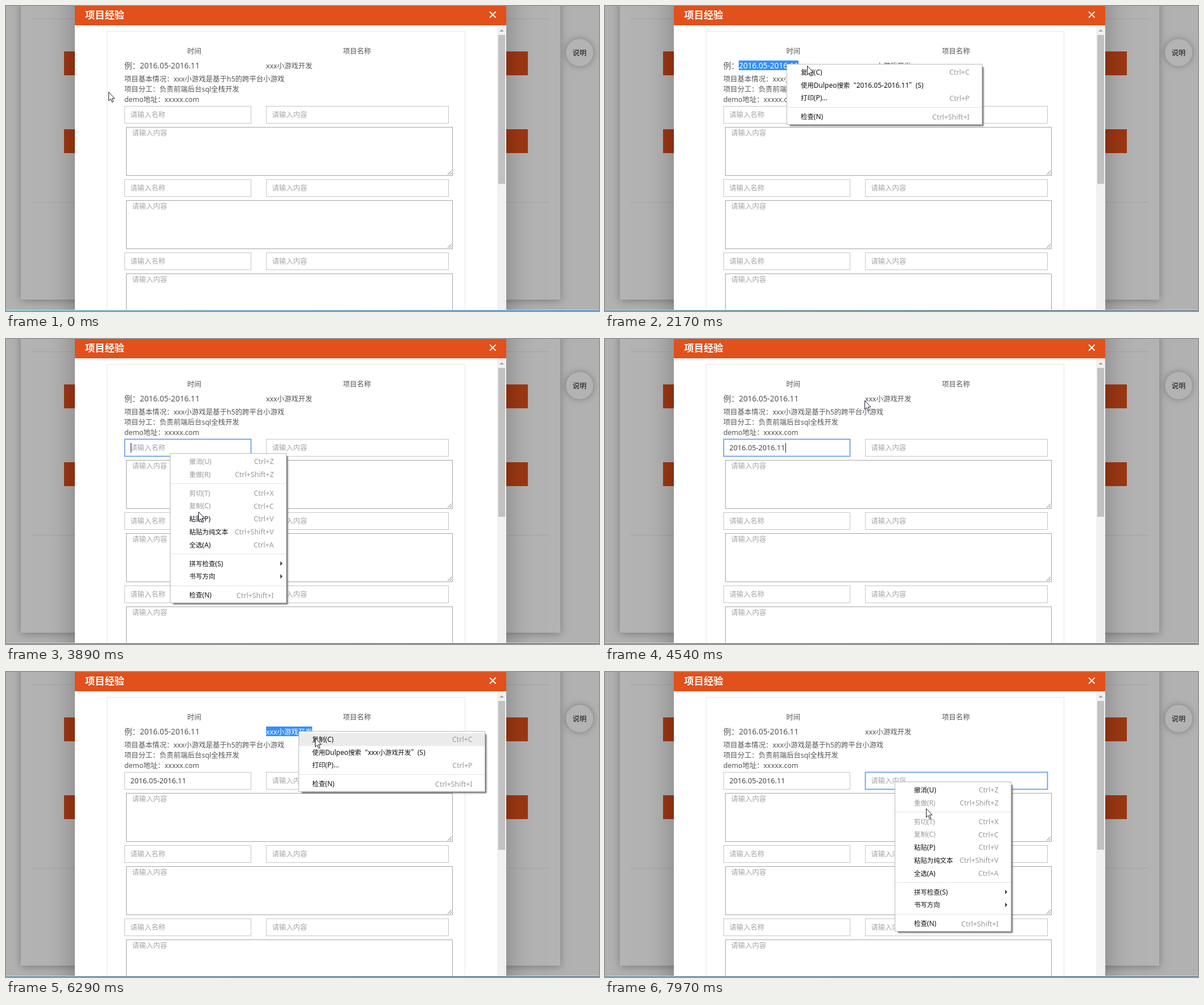
An HTML page with a canvas that plays this animation: 1042 px wide and 537 px high, repeating every 8 s.

```html
<!DOCTYPE html>
<html lang="zh-CN">
<head>
<meta charset="utf-8">
<style>
html, body { margin: 0; width: 100%; height: 100%; overflow: hidden; background: #b1b1b1; }
canvas { display: block; }
</style>
</head>
<body>
<canvas id="stage" width="1042" height="537"></canvas>
<script>
const c = document.getElementById('stage').getContext('2d');
const LOOP = 8000, STEP = 60;
const LATIN = '"Noto Sans","Open Sans","Noto Sans CJK SC",sans-serif';
const CJK = '"Noto Sans CJK SC","Noto Sans CJK",sans-serif';
const DATES = '2016.05-2016.11', GAME = 'xxx小游戏开发';

// Pointer path: time, x, y
const PATH = [
  [0, 181, 151], [240, 181, 151], [660, 250, 104], [780, 237, 104], [960, 236, 104],
  [1500, 346, 104], [1680, 330, 102], [1780, 320, 102], [1920, 320, 102], [2160, 355, 105],
  [2400, 362, 116], [2700, 297, 194], [2880, 289, 200], [3120, 289, 200], [3180, 298, 198],
  [3900, 342, 314], [4080, 342, 314], [4500, 456, 108], [4800, 457, 104], [4920, 457, 104],
  [5280, 542, 103], [5460, 541, 101], [5640, 515, 104], [5760, 515, 104], [5820, 522, 105],
  [6300, 546, 118], [6540, 546, 118], [6720, 514, 205], [7080, 508, 193], [7560, 509, 193],
  [7740, 513, 198], [7920, 564, 240], [8000, 564, 240]
];
// Times at which the pointer switches between arrow and I-beam
const SWITCHES = [480, 1920, 2520, 3120, 4560, 5400, 5520, 5760, 6960, 7560];

const copyMenu = query => [
  ['复制(C)', 'Ctrl+C'], [`使用Dulpeo搜索“${query}”(S)`], ['打印(P)...', 'Ctrl+P'], 0, ['检查(N)', 'Ctrl+Shift+I']
];
const editMenu = undoOff => [
  ['撤消(U)', 'Ctrl+Z', undoOff], ['重做(R)', 'Ctrl+Shift+Z', 1], 0,
  ['剪切(T)', 'Ctrl+X', 1], ['复制(C)', 'Ctrl+C', 1], ['粘贴(P)', 'Ctrl+V'],
  ['粘贴为纯文本', 'Ctrl+Shift+V'], ['全选(A)', 'Ctrl+A'], 0,
  ['拼写检查(S)', '>'], ['书写方向', '>'], 0, ['检查(N)', 'Ctrl+Shift+I']
];
const MENUS = [
  { from: 1960, to: 2420, x: 319, y: 102, w: 344, h: 107, pad: 25, items: copyMenu(DATES) },
  { from: 3130, to: 4080, x: 288, y: 201, w: 205, h: 264, pad: 34, items: editMenu(1) },
  { from: 5800, to: 6560, x: 514, y: 104, w: 328, h: 107, pad: 24, items: copyMenu(GAME) },
  { from: 7560, to: 8000, x: 509, y: 193, w: 205, h: 264, pad: 34, items: editMenu(0) }
];

function rect(x, y, w, h, color) {
  c.fillStyle = color;
  c.fillRect(x, y, w, h);
}
function box(x, y, w, h, color, line = 1) {
  c.strokeStyle = color;
  c.lineWidth = line;
  c.strokeRect(x + .5, y + .5, w - 1, h - 1);
}
function poly(points, x, y, fill, stroke) {
  c.beginPath();
  points.forEach(([px, py]) => c.lineTo(x + px, y + py));
  c.closePath();
  c.fillStyle = fill;
  c.fill();
  if (stroke) { c.strokeStyle = stroke; c.lineWidth = 1; c.stroke(); }
}
function lines(color, width, ...segments) {
  c.strokeStyle = color;
  c.lineWidth = width;
  c.beginPath();
  for (const [x1, y1, x2, y2] of segments) { c.moveTo(x1, y1); c.lineTo(x2, y2); }
  c.stroke();
}
function shadow(color, blur, draw, dy = 0) {
  c.save();
  c.shadowColor = color;
  c.shadowBlur = blur;
  c.shadowOffsetY = dy;
  draw();
  c.restore();
}
// Text centred on y; Chinese and Latin runs may differ in size
function text(str, x, y, color, size = 12.35, latin = size, weight = '') {
  c.fillStyle = color;
  for (const run of str.match(/[\x00-\xff]+|[^\x00-\xff]+/g)) {
    c.font = run.charCodeAt(0) < 256 ? `${weight} ${latin}px ${LATIN}` : `${weight} ${size}px ${CJK}`;
    c.fillText(run, x, y + size * .37);
    x += c.measureText(run).width;
  }
}

function page(t) {
  rect(0, 0, 1042, 537, '#b1b1b1');
  shadow('rgba(0,0,0,.3)', 14, () => rect(26, -20, 948, 537, '#b3b3b3'), 2);
  rect(45, 22, 910, 1, '#a3a3a3');
  rect(45, 345, 910, 1, '#a3a3a3');
  for (const y of [80, 217]) rect(102, y, 815, 42, '#9e3813');
  c.beginPath();
  c.arc(1008, 82, 24, 0, 7);
  c.fillStyle = '#b3b3b3';
  shadow('rgba(0,0,0,.3)', 12, () => c.fill());
  text('说明', 995.5, 82.5, '#161616');

  shadow('rgba(0,0,0,.3)', 50, () => rect(121, -60, 758, 660, '#fff'));
  rect(121, 0, 758, 34, '#e2501b');
  text('项目经验', 139, 16, '#fff', 17.2, 17.2, 'bold');
  lines('#fff', 1.8, [850, 10, 860.5, 20.5], [860.5, 10, 850, 20.5]);
  rect(863, 34, 16, 502, '#f1f1f1');
  rect(865, 51, 12, 262, '#c1c1c1');
  poly([[-4, 2], [0, -2], [4, 2]], 871, 43, '#a3a3a3');

  box(177, 44, 630, 520, '#e6e6e6');
  text('时间', 318.5, 79, '#555');
  text('项目名称', 592, 79, '#555');
  text('例：' + DATES, 208, 105, '#555', 13.6);
  text(GAME, 457, 105, '#555');
  text('项目基本情况：xxx小游戏是基于h5的跨平台小游戏', 208, 128, '#555');
  text('项目分工：负责前端后台sql全栈开发', 208, 146, '#555');
  text('demo地址：xxxxx.com', 208, 164, '#555');

  const pasted = t >= 4080;
  for (let i = 0; i < 3; i++) {
    const y = 176 + i * 129;
    box(208, y, 223, 31, '#c6c6c6');
    box(457, y, 321, 31, '#c6c6c6');
    box(211, y + 37, 574, 86, '#a5a5a5');
    lines('#777', 1, [776, y + 121, 783, y + 114], [780, y + 121, 783, y + 118]);
    if (i || !pasted) text('请输入名称', 218.5, y + 15.5, '#a5a5a5');
    text('请输入内容', 467.5, y + 15.5, '#a5a5a5');
    text('请输入内容', 221.5, y + 47, '#a5a5a5');
  }
  if (pasted) text(DATES, 218.5, 191.5, '#444', 12.7);
  if (t >= 2830 && t < 4970) focus(208, 223, pasted ? 317 : 219, t - (pasted ? 4080 : 2830));
  if (t >= 7400) focus(457, 321, 468, t - 7400);
}

function focus(x, w, caret, age) {
  box(x, 176, w, 31, '#6d9eea', 1.8);
  if (age % 1060 < 530) rect(caret, 183, 1, 17, '#222');
}

function select(x, end, draw) {
  if (end <= x) return;
  c.save();
  c.beginPath();
  c.rect(x, 96, end - x, 17);
  c.clip();
  rect(x, 96, end - x, 17, '#3390ff');
  draw();
  c.restore();
}

function menu({ x, y, w, h, pad, items }, mouse) {
  shadow('rgba(0,0,0,.6)', 3, () => rect(x + 6, y + 6, w - 4, h - 4, '#8a8a8a'));
  rect(x, y, w, h, '#fff');
  box(x, y, w, h, '#b9b9b9');
  let row = y + 14.7;
  for (const item of items) {
    if (!item) {
      rect(x + 1, Math.round(row - 7), w - 2, 1, '#e3e3e3');
      row += 10.2;
      continue;
    }
    const [label, key, off] = item;
    const inside = mouse.x > x && mouse.x < x + w && Math.abs(mouse.y - row) < 9.5;
    if (inside && !off) rect(x + 1, row - 11, w - 2, 22.6, '#ebebeb');
    text(label, x + pad, row, off ? '#999' : '#111', 11.4, 12);
    if (key === '>') poly([[0, -4], [4, 0], [0, 4]], x + 194, row, '#444');
    else if (key) {
      c.textAlign = 'right';
      text(key, x + w - 22.5, row, '#999', 12.4);
      c.textAlign = 'left';
    }
    row += 22.75;
  }
}

function pointer(t) {
  const q = Math.floor(t / STEP) * STEP;
  const i = PATH.findIndex(k => k[0] > q);
  const [t0, x0, y0] = PATH[i - 1], [t1, x1, y1] = PATH[i], f = (q - t0) / (t1 - t0);
  return {
    x: t < 70 ? 180 : Math.round(x0 + (x1 - x0) * f),
    y: Math.round(y0 + (y1 - y0) * f),
    beam: SWITCHES.filter(s => s <= q).length % 2
  };
}
function drawPointer({ x, y, beam }) {
  if (beam) {
    rect(x, y - 7, 1, 15, '#111');
    for (const dy of [-8, 8]) { rect(x - 3, y + dy, 3, 1, '#111'); rect(x + 1, y + dy, 3, 1, '#111'); }
  } else {
    poly([[0, 0], [0, 15.5], [3.5, 12.2], [6, 18], [8.3, 17], [5.8, 11.3], [10.5, 11.3]],
      x + .5, y + .5, '#fff', '#1a1a2a');
  }
}

function bottomEdge(t) {
  const g = c.createLinearGradient(0, 0, 1042, 0);
  const [left, right] = t < 970 ? ['#62aeb8', '#2763a8'] : ['#40788a', '#2b4b68'];
  g.addColorStop(0, left);
  g.addColorStop(1, right);
  rect(0, 535, 1042, 1, '#d5e2e6');
  rect(0, 536, 1042, 1, g);
}

function draw(t) {
  const mouse = pointer(t);
  page(t);
  if (t >= 970 && t < 2830) {
    select(235, t < 1500 ? Math.min(340, mouse.x) : 340, () => text('例：' + DATES, 208, 105, '#fff', 13.6));
  }
  if (t >= 4970 && t < 7400) {
    select(457, t < 5280 ? Math.min(538, mouse.x) : 538, () => text(GAME, 457, 105, '#fff'));
  }
  bottomEdge(t);
  for (const m of MENUS) if (t >= m.from && t < m.to) menu(m, mouse);
  drawPointer(mouse);
}

function tick() {
  draw(performance.now() % LOOP);
  requestAnimationFrame(tick);
}
tick();
</script>
</body>
</html>
```
